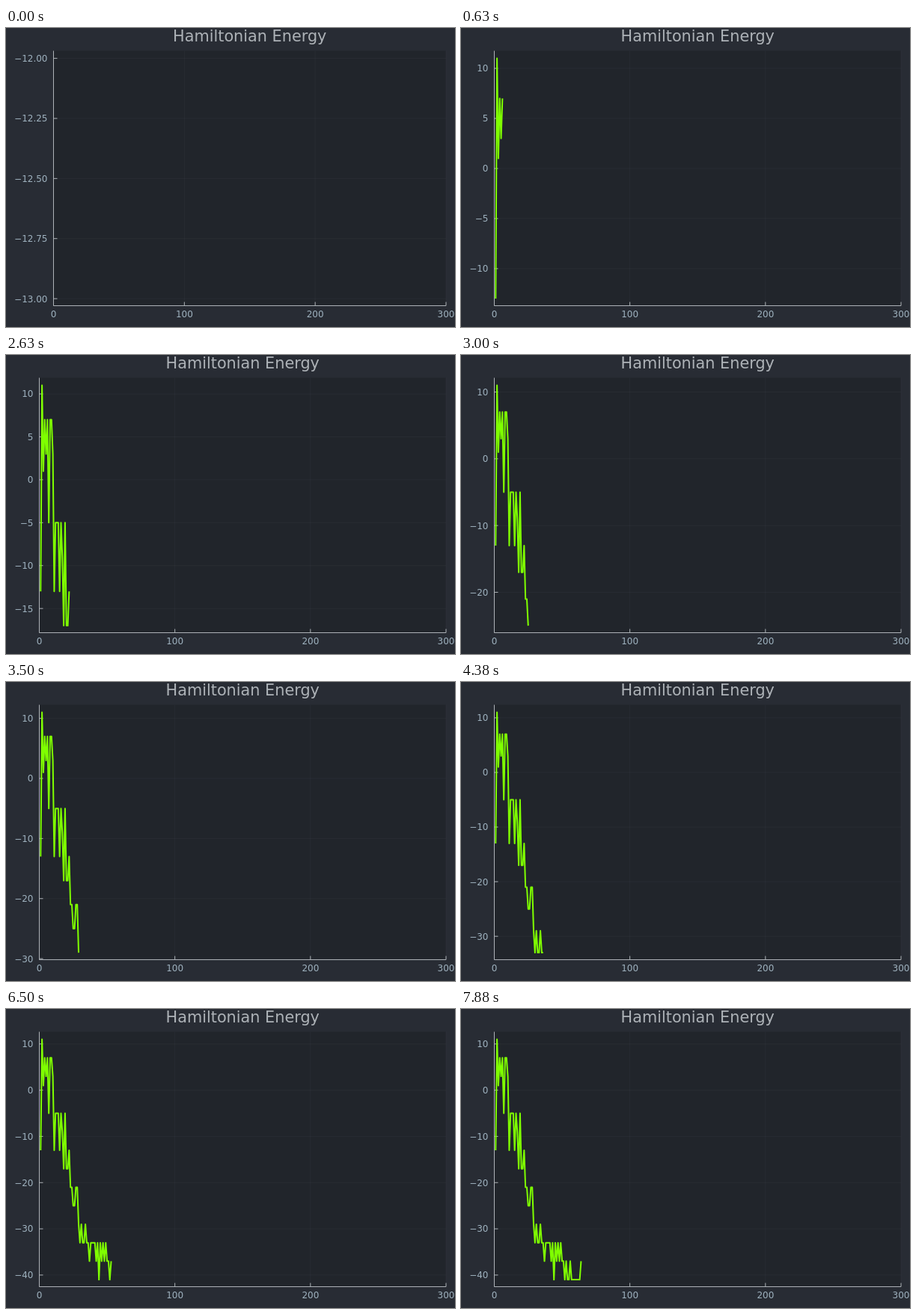
Recreate the animation shown at these times as an HTML page. Size 600 by 400 pixels, loop 8 s.

```html
<!DOCTYPE html>
<html lang="en">
<head>
<meta charset="utf-8">
<title>Hamiltonian Energy</title>
<style>
  html, body { margin: 0; width: 100%; height: 100%; overflow: hidden; background: #282c34; }
  svg { display: block; width: 600px; height: 400px; }
  text { font: 12px "DejaVu Sans", sans-serif; fill: #9eb1be; text-anchor: middle; }
  .title { font-size: 20.8px; fill: #adb2b7; }
  .y { text-anchor: end; }
  .panel { fill: #21252b; }
  .grid { stroke: #adb2b7; stroke-opacity: .05; }
  .axis { stroke: #adb2b7; fill: none; }
  .curve { stroke: #7fff00; stroke-width: 2; stroke-linejoin: round; fill: none; }
</style>
</head>
<body>
<svg id="plot" viewBox="0 0 600 400"></svg>
<script>
const LOOP = 8000, STEP = 125;
const TOP = 30.5, RIGHT = 588, BOTTOM = 371.5;
const DATA_TOP = 40.6, DATA_HEIGHT = 321.5;
const TICK = 5;

const energy = [
  -13, 11, 1, 7, 3, 7, -5, 7, 7, 3, -13, -5, -5, -5, -13, -5,
  -9, -17, -5, -17, -17, -13, -21, -21, -25, -25, -21, -21, -29, -33, -29, -33,
  -33, -29, -33, -33, -37, -33, -33, -33, -33, -37, -33, -41, -33, -37, -33, -37,
  -33, -37, -37, -41, -37, -41, -41, -37, -41, -41, -41, -41, -41, -41, -41, -37
];

const plot = document.getElementById("plot");
const path = (cls, d) => `<path class="${cls}" d="${d}"/>`;
const label = (cls, x, y, s) => `<text class="${cls}" x="${x}" y="${y}">${s}</text>`;

function yTicks(lo, hi) {
  const span = hi - lo, pad = span * 0.03;
  const step = span <= 1 ? 0.25 : span < 30 ? 5 : 10;
  const ticks = [];
  for (let v = Math.ceil((lo - pad) / step) * step; v <= hi + pad; v += step) ticks.push(v);
  return ticks;
}

function draw(count) {
  const values = energy.slice(0, count);
  const single = count === 1;
  const lo = Math.min(...values);
  const hi = single ? lo + 1 : Math.max(...values);
  const left = single ? 63.5 : 44.5;
  const px = x => left + x * (RIGHT - left) / 300;
  const py = y => DATA_TOP + (hi - y) * DATA_HEIGHT / (hi - lo);

  let grid = "", axis = `M${left} ${TOP}V${BOTTOM}H${RIGHT}`, labels = "";
  for (const v of [0, 100, 200, 300]) {
    const x = px(v);
    grid += `M${x} ${TOP}V${BOTTOM}`;
    axis += `M${x} ${BOTTOM}v${-TICK}`;
    labels += label("x", x, 387.4, v);
  }
  for (const v of yTicks(lo, hi)) {
    const y = py(v);
    const name = v.toFixed(single ? 2 : 0).replace("-", "\u2212");
    grid += `M${left} ${y}H${RIGHT}`;
    axis += `M${left} ${y}h${TICK}`;
    labels += label("y", left - 8, y + 4.4, name);
  }
  const curve = single ? "" : "M" + values.map((v, i) => `${px(i + 1)} ${py(v)}`).join("L");

  plot.innerHTML =
    `<rect class="panel" x="${left}" y="${TOP}" width="${RIGHT - left}" height="${BOTTOM - TOP}"/>` +
    path("grid", grid) + path("axis", axis) + path("curve", curve) + labels +
    label("title", (left + RIGHT) / 2, 18.2, "Hamiltonian Energy");
}

let shown = 0;
function tick() {
  // Steps fall on whole hundredths of a second.
  const time = Math.floor(performance.now() % LOOP / 10) * 10;
  const count = Math.floor(time / STEP) + 1;
  if (count !== shown) draw(shown = count);
  requestAnimationFrame(tick);
}
tick();
</script>
</body>
</html>
```
